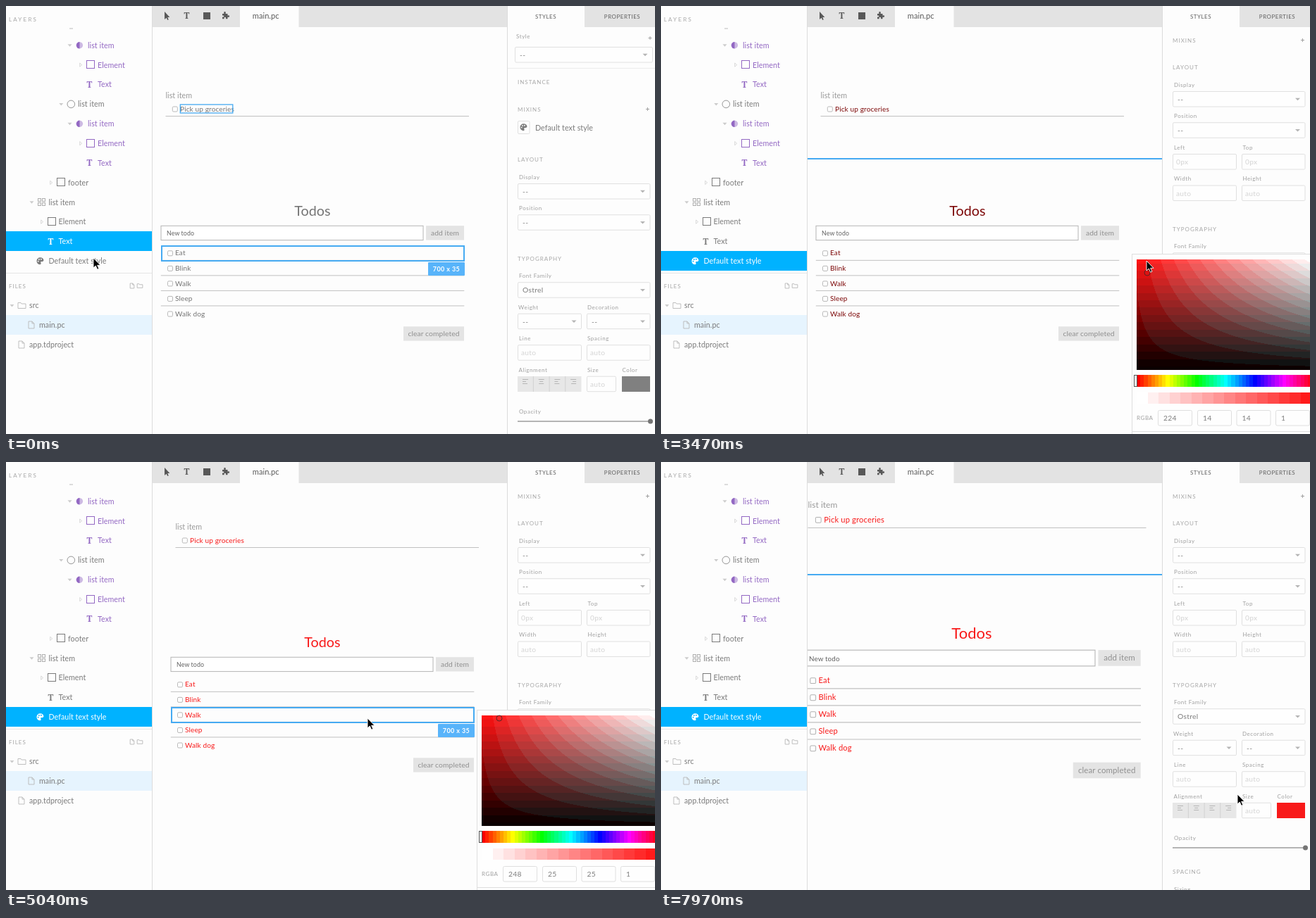
These frames come from a looping animation (921 by 608 pixels, 8 s). An HTML page with a canvas:

```html
<!DOCTYPE html>
<html lang="en">
<head>
<meta charset="utf-8">
<title>Todo editor</title>
<style>
  html, body { margin: 0; width: 100%; height: 100%; overflow: hidden; background: #fdfdfd; }
  svg, canvas { position: absolute; left: 0; top: 0; }
  #pad { left: 668px; top: 352px; }
  text { font: 10.7px Lato, "Open Sans", sans-serif; letter-spacing: .05px; fill: currentColor; }
  .head { font-size: 8px; letter-spacing: 1px; fill: #a8a8a8; }
  .label { font-size: 8px; letter-spacing: .55px; fill: #a0a0a0; }
  .tab { font-size: 8px; letter-spacing: .5px; fill: #606060; }
  .value { font-size: 10.3px; letter-spacing: .3px; fill: #7d7d7d; }
  .hint { font-size: 10.2px; letter-spacing: .3px; fill: #d4d4d4; }
  .item { font-size: 10px; letter-spacing: .15px; }
  .title { font-size: 19.7px; }
  .button { font-size: 10.3px; letter-spacing: .1px; fill: #8f8f8f; }
  .entry { font-size: 8.8px; letter-spacing: .1px; fill: #606060; }
  .size { font-size: 9px; font-weight: 700; letter-spacing: .4px; fill: #fff; }
  .glyph { font: 700 12px "Noto Serif", serif; }
  .grey { color: #7b7b7b; }
  .purple { color: #9368c3; }
  .on { color: #fff; }
  .line { fill: none; stroke: currentColor; }
  .thin { fill: none; stroke: #b8b8b8; stroke-width: .9; }
  .outline { fill: none; stroke: #45aaf2; stroke-width: 2; }
</style>
</head>
<body>
<svg id="app" width="921" height="608"></svg>
<canvas id="pad" width="253" height="256"></canvas>
<svg id="over" width="921" height="608"></svg>
<script>
const $ = id => document.getElementById(id);
const text = (x, y, s, cls = '', extra = '') =>
  `<text x="${x}" y="${y}" dy=".36em" class="${cls}" ${extra}>${s}</text>`;
const rect = (x, y, w, h, attrs) => `<rect x="${x}" y="${y}" width="${w}" height="${h}" ${attrs}/>`;
const path = (d, attrs = '') => `<path d="${d}" ${attrs}/>`;
const group = (id, body, attrs = '') => `<g id="${id}" ${attrs}>${body}</g>`;
const show = (id, on) => { $(id).style.display = on ? '' : 'none'; };

// Icons, centred on x, y
const icons = {
  square: (x, y) => rect(x - 5.5, Math.floor(y) - 5.5, 11, 11, 'class="line"'),
  circle: (x, y) => `<circle cx="${x}" cy="${y}" r="5.3" class="line" opacity=".8"/>`,
  half: (x, y) => `<circle cx="${x}" cy="${y}" r="4.6" fill="currentColor" opacity=".45"/>` +
    path(`M${x} ${y - 4.8}a4.8 4.8 0 0 0 0 9.6z`, 'fill="currentColor"'),
  type: (x, y) => text(x, y, 'T', 'glyph', 'text-anchor="middle"'),
  grid: (x, y) => [[-5, -5], [1, -5], [-5, 1], [1, 1]].map(([a, b]) =>
    rect(x + a, Math.floor(y) + b + .5, 4, 4, 'fill="none" stroke="#b0b0b0"')).join(''),
  palette: (x, y) => path(`M${x} ${y - 5}a5 5 0 1 0 0 10q2-1 .6-3 0-1.5 2-1.2 2.4 0 2.4-1.8a5 4.8 0 0 0-5-4z`, 'fill="currentColor"') +
    [[-2.8, .3], [-1.6, -2.4], [1.4, -2.6]].map(([a, b]) =>
      `<circle cx="${x + a}" cy="${y + b}" r=".95" class="hole"/>`).join(''),
  page: (x, y, k = 1) => path(`M${x - 4 * k} ${y - 5 * k}h${5 * k}l${3 * k} ${3 * k}v${7 * k}h${-8 * k}zm${5 * k} 0v${3 * k}h${3 * k}`, 'class="thin"'),
  folder: (x, y, k = 1) => path(`M${x - 5.5 * k} ${y - 4 * k}h${4 * k}l${k} ${1.5 * k}h${6 * k}v${6.5 * k}h${-11 * k}z`, 'class="thin"')
};
const openArrow = (x, y) => path(`M${x - 3} ${y - 1.5}h6l-3 3.5z`, 'fill="#ccc"');
const shutArrow = (x, y) => path(`M${x - 1.3} ${y - 2.6}l3 2.6-3 2.6z`, 'fill="none" stroke="#d0d0d0" stroke-width=".8"');

// Left side
const pitch = 27.87;
const layers = [
  ['list item', 'half', 104.5, 116, 'purple', openArrow], ['Element', 'square', 120, 130, 'purple', shutArrow],
  ['Text', 'type', 118.5, 130, 'purple'], ['list item', 'circle', 92.3, 102, 'grey', openArrow],
  ['list item', 'half', 104.5, 116, 'purple', openArrow], ['Element', 'square', 120, 130, 'purple', shutArrow],
  ['Text', 'type', 118.5, 130, 'purple'], ['footer', 'square', 78, 88, 'grey', shutArrow],
  ['list item', 'grid', 50.5, 60.5, 'grey', openArrow], ['Element', 'square', 65, 74.5, 'grey', shutArrow],
  ['Text', 'type', 63.5, 74.5, 'grey'], ['Default text style', 'palette', 48.5, 60.5, 'grey']
];
const layerRow = ([name, icon, ix, tx, tone, arrow], i) => {
  const y = 55.8 + i * pitch;
  return group('layer' + i, (arrow ? arrow(ix - 14, y) : '') + icons[icon](ix, y) + text(tx, y, name), `class="${tone}"`);
};
const left = text(4, 19, 'LAYERS', 'head', 'style="letter-spacing:2.2px"') +
  path('M90 32h5', 'stroke="#bbb"') +
  rect(0, 0, 207.5, 28, 'id="mark" fill="#00b2ff"') + layers.map(layerRow).join('') +
  path('M0 379.5h207', 'stroke="#e6e6e6"') + text(4, 398.5, 'FILES', 'head') +
  icons.page(179, 397.5, .7) + icons.folder(190, 397.5, .7) +
  rect(0, 439, 207.5, 28, 'fill="#e6f4fe"') +
  `<g class="grey">${openArrow(8.5, 425.5)}${icons.folder(22.5, 425.5)}${text(33, 425.5, 'src')}
  ${icons.page(36, 453)}${text(47, 453.3, 'main.pc')}${icons.page(22, 481)}${text(33, 481, 'app.tdproject')}</g>` +
  path('M207.5 0v608', 'stroke="#dcdcdc"');

// Canvas in the middle
const rowTop = 340.3, rowStep = 21.55;
const check = (x, y) => rect(x, y, 7, 7, 'rx="1.5" fill="#fff" stroke="#b0b0b0" stroke-width=".9"');
const button = (x, y, w, s) => rect(x, y, w, 20.3, 'fill="#e4e4e4"') + text(x + w / 2, y + 10, s, 'button', 'text-anchor="middle"');
const rule = (x, y) => path(`M${x} ${y}h430.5`, 'stroke="#c0c0c0"');
const todo = (s, i) => {
  const y = 350.8 + i * rowStep;
  return check(229.5, y - 3) + text(240, y, s, 'item') + (i < 4 ? rule(219.8, y + 10.5) : '');
};
const world = text(226.5, 127, 'list item', '', 'style="fill:#999"') + check(236.3, 143) +
  text(247, 146.2, 'Pick up groceries', 'item') + rule(226.5, 156.5) +
  text(435, 290.5, 'Todos', 'title', 'text-anchor="middle"') +
  rect(220, 312.3, 372, 20.3, 'fill="#fff" stroke="#b4b4b4"') + text(228, 323, 'New todo', 'entry') +
  button(596, 312.2, 54, 'add item') + ['Eat', 'Blink', 'Walk', 'Sleep', 'Walk dog'].map(todo).join('') +
  button(564, 455.3, 86, 'clear completed');
const overlay = rect(247.3, 140, 74.5, 12, 'id="picked" class="outline" style="stroke-width:1.3"') +
  rect(0, 0, 0, 0, 'id="hover" class="outline"') +
  group('badge', rect(-52, 0, 52, 19, 'rx="1" fill="#58b4fa"') + text(-26, 9.5, '', 'size', 'id="dims" text-anchor="middle"'));
const middle = '<clipPath id="stage"><rect x="208" y="30" width="503" height="578"/></clipPath>' +
  `<g clip-path="url(#stage)">${group('world', world)}${overlay}</g>` +
  rect(208, 0, 503, 30, 'fill="#e3e3e3"') + rect(332, 0, 83.5, 30.5, 'fill="#fdfdfd"') +
  `<g color="#585858">${path('M225 8v11l2.6-2.3 1.6 3.3 1.6-.8-1.6-3.2h3.2z', 'fill="currentColor"')}
  ${icons.type(256.5, 14)}${rect(280, 9, 10, 10, 'fill="currentColor"')}
  ${path('M307 11h2.5q-1-3 1-3t1 3h3v2.6q2.6-1 2.6 1t-2.6 1v2.6h-2.7q.8-2.4-1-2.4t-1 2.4H307v-2.6q2.4.6 2.4-1t-2.4-1z', 'fill="currentColor"')}
  ${text(368.7, 14, 'main.pc', '', 'text-anchor="middle" style="font-size:11px"')}</g>`;

// Right side
const frame = 'rx="1.5" fill="#fefefe" stroke="#e0e0e0"';
const tri = (x, y) => path(`M${x - 3.5} ${y - 1.5}h7l-3.5 3.5z`, 'fill="#b5b5b5"');
const select = (x, y, w, s = '--') => rect(x, y, w, 21.5, frame) + text(x + 6.5, y + 11, s, 'value') + tri(x + w - 10.5, y + 10.8);
const input = (x, y, w, s) => rect(x, y, w, 21.5, frame) + text(x + 4.5, y + 11, s, 'hint');
const plus = (x, y) => path(`M${x - 2.5} ${y}h5m-2.5-2.5v5`, 'stroke="#999" stroke-width=".9"');
const aligns = [0, 1, 2, 3].map(i => {
  const x = 737 + i * 22.7;
  const lines = [8, 5, 7].map((w, k) => `M${x - 4 + [0, (8 - w) / 2, 0, 8 - w][i]} ${530.5 + k * 3}h${w}`).join('');
  return path(lines, 'stroke="#b0b0b0" stroke-width=".9"') + (i ? path(`M${x - 11.3} 526v22`, 'stroke="#d2d2d2"') : '');
}).join('');
const right = rect(711.5, -1, 212, 611, 'fill="#fdfdfd" stroke="#dcdcdc"') +
  rect(821, 0, 100, 30, 'fill="#e3e3e3"') + text(766, 15, 'STYLES', 'tab', 'text-anchor="middle"') +
  text(874.5, 15, 'PROPERTIES', 'tab', 'text-anchor="middle"') +
  group('instance', text(724, 43, 'Style', 'label') + plus(914, 45.5) + select(722.5, 58.5, 195) +
    path('M712 88.5h209', 'stroke="#ececec"') + text(726, 108, 'INSTANCE', 'head') +
    rect(726.5, 163.5, 16.5, 18, frame) + icons.palette(734.5, 172.3) + text(751, 172.7, 'Default text style'), 'class="grey"') +
  group('mixins', text(726, 147.3, 'MIXINS', 'head') + plus(910.5, 146.5)) +
  group('layout', text(726, 218.3, 'LAYOUT', 'head') + text(728, 243, 'Display', 'label') + select(726.5, 252.5, 187.5) +
    text(728, 287.3, 'Position', 'label') + select(726.5, 296.7, 187.5)) +
  group('place', text(728, 201, 'Left', 'label') + text(825.5, 201, 'Top', 'label') +
    input(726.5, 210.5, 90, '0px') + input(824.5, 210.5, 89.5, '0px') +
    text(728, 245.5, 'Width', 'label') + text(825.5, 245.5, 'Height', 'label') +
    input(726.5, 255, 90, 'auto') + input(824.5, 255, 89.5, 'auto')) +
  group('type', text(726, 358.7, 'TYPOGRAPHY', 'head') + text(728, 383.5, 'Font Family', 'label') + select(726.5, 392.7, 187.5, 'Ostrel') +
    text(727, 428, 'Weight', 'label') + text(825, 428, 'Decoration', 'label') + select(726.5, 437.2, 90) + select(824.5, 437.2, 89.5) +
    text(728, 472.3, 'Line', 'label') + text(825, 472.3, 'Spacing', 'label') + input(726.5, 481.7, 90, 'auto') + input(824.5, 481.7, 89.5, 'auto') +
    text(727.5, 516.7, 'Alignment', 'label') + text(825, 516.7, 'Size', 'label') + text(874.5, 516.7, 'Color', 'label') +
    rect(726, 526, 90.5, 22, 'fill="#e7e7e7"') + aligns + input(824.5, 526.2, 41, 'auto') +
    rect(874, 526, 40, 22, 'id="swatch"') + text(728, 575.7, 'Opacity', 'label') +
    path('M726 590h188', 'stroke="#b4b4b4" stroke-width="2"') + '<circle cx="914.5" cy="590" r="3.5" fill="#757575"/>' +
    text(726, 624.5, 'SPACING', 'head') + text(728, 649.5, 'Sizing', 'label'));

$('app').innerHTML = `<style>.hole { fill: #fdfdfd; } .on .hole { fill: #00b2ff; }</style>` + left + middle + right;

// Colour picker
const slots = [705, 761, 816.5, 872];
$('over').innerHTML = group('picker',
  `<circle id="ring" r="4" fill="none" stroke="#5a2424"/>` + rect(671.5, 524.5, 4, 16, 'fill="#fff" stroke="#555"') +
  text(675, 585.5, 'RGBA', 'label') +
  slots.map((x, i) => rect(x + .5, 574.5, 48, 21.5, 'rx="2" fill="none" stroke="#dfdfdf"') +
    text(x + 8, 585.5, 1, 'value', `id="chan${i}"`)).join('')) +
  path('M0 0v14l3.3-3 2.3 5.2 2.3-1-2.3-4.9H10z', 'id="cursor" stroke="#fff" stroke-width=".9"');

const padW = 248, padH = 156.8;
function drawPad() {
  const c = $('pad').getContext('2d');
  c.fillStyle = '#fefefe';
  c.fillRect(0, 0, 253, 256);
  c.fillStyle = '#dedede';
  c.fillRect(0, 0, 253, 1);
  c.fillRect(0, 0, 1, 256);
  c.fillRect(0, 252, 253, 1);
  const img = c.createImageData(246, 157);
  const band = (v, n) => Math.round(v * n) / n * 255;
  for (let y = 0, p = 0; y < 157; y++) for (let x = 0; x < 246; x++, p += 4) {
    const v = 1 - y / padH, g = band(v * (.05 + .95 * x / padW), 14);
    img.data.set([Math.max(band(v, 15), 12), g, g, 255], p);
  }
  c.putImageData(img, 7, 8);
  for (let i = 0; i < 48; i++) {
    c.fillStyle = `hsl(${i * 7.5},100%,50%)`;
    c.fillRect(Math.round(7 + i * 5.17), 172, 6, 17);
  }
  for (let i = 0; i < 16; i++) {
    const g = 255 - i * 15.2;
    c.fillStyle = `rgb(255,${g},${g})`;
    c.fillRect(Math.round(7 + i * 15.5), 197, 16, 16);
  }
}
drawPad();

// Pan, then zoom around the pointer
function viewAt(t) {
  const k = t < 4560 ? 0 : Math.floor((t - 4560) / 120) + 1;
  const pan = k > 4 ? 1 : 1 - .5 ** k;
  const zoom = t < 5280 ? 0 : Math.min(1, (Math.floor((t - 5280) / 105) + 1) / 3);
  return { s: 1 + .115 * zoom, x: 14 * pan - 58.1 * zoom, y: -35 * pan - 46 * zoom };
}
const pickerOpen = t => t >= 2350 && t < 7170;

const itemBox = i => ({ x: 221, y: rowTop + i * rowStep + .9, w: 428.5, h: 20.5, dims: '700 x 35' });
const inputBox = { x: 220, y: 312.5, w: 372, h: 20, dims: '606 x 33' };
const rootBox = { x: -300, y: 217, w: 1500, h: 1000 };
function hit(t, x, y, v) {
  if (x < 208 || x > 711 || (pickerOpen(t) && x > 668 && y > 352)) return;
  const px = (x - v.x) / v.s, py = (y - v.y) / v.s, row = Math.floor((py - rowTop) / rowStep);
  if (px > 220 && px < 650 && row >= 0 && row < 5) return itemBox(row);
  return px > 220 && px < 592 && py > 312 && py < 333 ? inputBox : rootBox;
}

// Pointer moves: first time, last time, count, target x, y
const moves = [
  [1080, 1080, 1, 129, 358], [1230, 1990, 8, 885, 490], [2530, 2870, 4, 760, 470],
  [2980, 3210, 3, 690, 440], [3320, 3320, 1, 690, 379], [3470, 3470, 1, 689, 362],
  [3580, 3790, 3, 700, 364], [3940, 3940, 1, 700, 364], [4080, 4440, 4, 519, 369],
  [4560, 5040, 5, 513, 364], [5280, 5490, 3, 513, 364], [6000, 6240, 3, 575, 280],
  [6450, 6570, 2, 690, 318], [6690, 6810, 2, 774, 335], [7050, 7050, 1, 778, 325],
  [7380, 7970, 6, 818, 472]
];
const steps = [
  { t: 0, x: 124, y: 358, view: viewAt(0), hover: itemBox(0) },
  { t: 840, x: 124, y: 358, view: viewAt(0), hover: null }
];
for (const [t0, t1, n, x1, y1] of moves) {
  const from = steps[steps.length - 1];
  for (let k = 0; k < n; k++) {
    const t = n > 1 ? t0 + (t1 - t0) * k / (n - 1) : t0;
    const p = (k + 1) / n, e = p * p * (3 - 2 * p);
    const x = from.x + (x1 - from.x) * e, y = from.y + (y1 - from.y) * e, view = viewAt(t);
    steps.push({ t, x, y, view, hover: hit(t, x, y, view) || steps[steps.length - 1].hover });
  }
}

// The ring trails the pointer by one step, the page by two
const dragFrom = steps.findIndex(s => s.t >= 2980), dragTo = steps.findIndex(s => s.t >= 3790);
const dragged = i => i < dragFrom ? null : steps[Math.min(i, dragTo)];
function colourAt({ x, y }) {
  const r = 255 * (1 - (y - 360) / padH), g = r * (x - 675) / padW;
  return [r, g, g].map(Math.round);
}

// Outlines stay on whole pixels at any zoom
function drawHover(h, v) {
  show('hover', h);
  show('badge', h && h.dims);
  if (!h) return;
  const x = Math.floor(h.x * v.s + v.x), y = Math.floor(h.y * v.s + v.y);
  const box = { x, y, width: Math.round(h.w * v.s), height: Math.round(h.h * v.s) };
  for (const k in box) $('hover').setAttribute(k, box[k]);
  $('badge').setAttribute('transform', `translate(${x + box.width + 1} ${y + box.height + 2})`);
  $('dims').textContent = h.dims || '';
}

function render(t) {
  let i = steps.length - 1;
  while (steps[i].t > t) i--;
  const { x, y, view: v, hover } = steps[i];
  const early = t < 840, ring = dragged(i - 1), ink = dragged(i - 2);
  const lift = (id, dy) => $(id).setAttribute('transform', `translate(0 ${early ? 0 : -dy})`);

  $('cursor').setAttribute('transform', `translate(${x} ${y})`);
  $('mark').setAttribute('y', early ? 320 : 348);
  $('layer10').setAttribute('class', early ? 'on' : 'grey');
  $('layer11').setAttribute('class', early ? 'grey' : 'on');
  show('picked', early);
  show('instance', early);
  show('place', !early);
  lift('mixins', 98);
  lift('layout', 131);
  lift('type', 42);

  $('world').setAttribute('transform', `translate(${v.x} ${v.y}) scale(${v.s})`);
  $('world').style.color = ink ? `rgb(${colourAt(ink)})` : '#757575';
  $('swatch').setAttribute('fill', ink ? `rgb(${colourAt(ink)})` : '#808080');
  $('swatch').setAttribute('stroke', t >= 2260 && t < 7170 ? '#a9a9c4' : 'none');
  drawHover(hover, v);

  show('pad', pickerOpen(t));
  show('picker', pickerOpen(t));
  const spot = ring || { x: 923, y: 438 };
  $('ring').setAttribute('cx', spot.x);
  $('ring').setAttribute('cy', spot.y);
  (ring ? colourAt(ring) : [128, 128, 128]).forEach((c, k) => { $('chan' + k).textContent = c; });
}

const start = performance.now();
function tick() {
  render((performance.now() - start) % 8000);
  requestAnimationFrame(tick);
}
tick();
</script>
</body>
</html>
```
